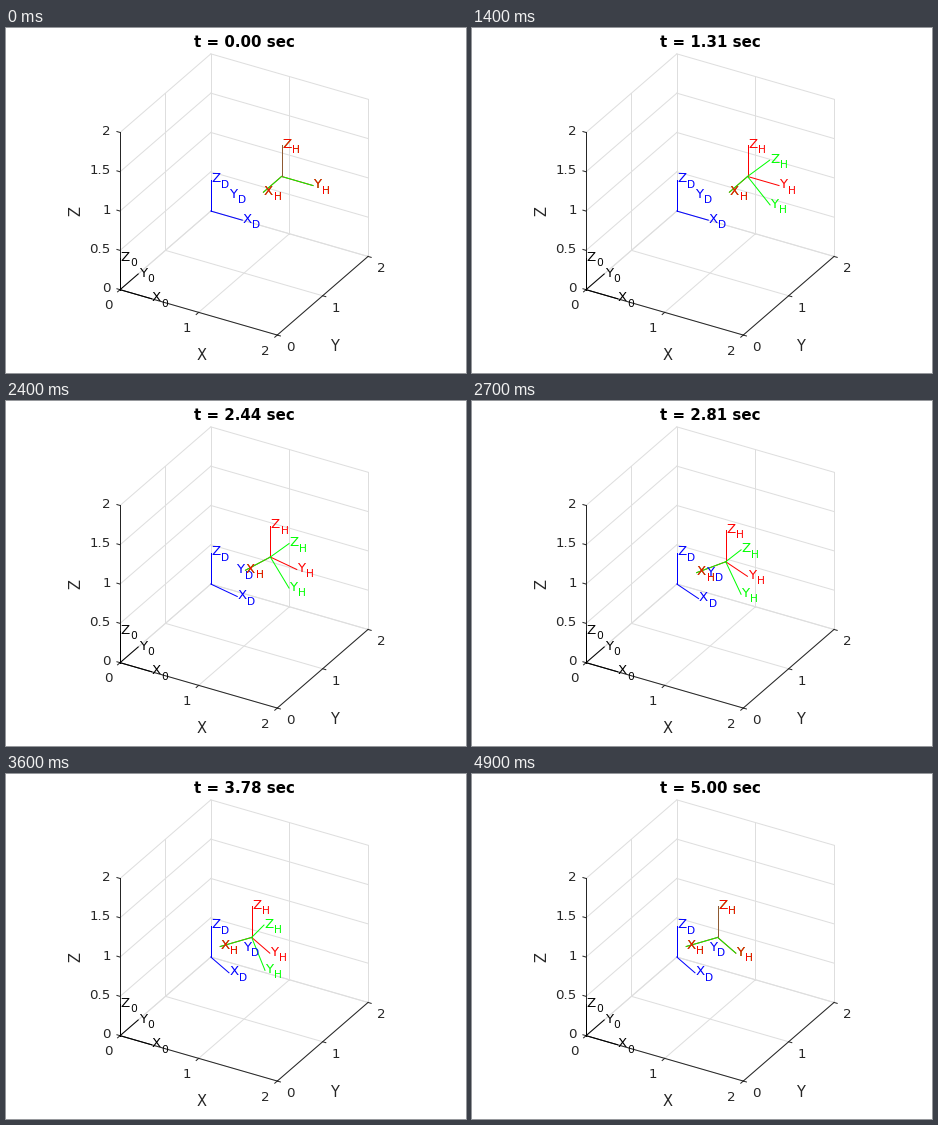
Animation, 460 px wide and 345 px high, one loop 4.95 s. Source, as a matplotlib script:

```python
import numpy as np
import matplotlib.pyplot as plt
from matplotlib.animation import FuncAnimation

W, H, DPI = 460, 345, 80
SEG_FRAMES = 33                      # each phase includes both end poses
SEG_TIMES = [0, 1.5, 3.5, 5]
ROLL, YAW = np.radians(45), np.radians(30)
AXIS_LEN = 0.4

# Orthographic view, azimuth and elevation 30 degrees
SCALE = 90.76
VIEW = SCALE * np.array([[np.sqrt(3) / 2, 0.25],
                         [0.5, -np.sqrt(3) / 4],
                         [0, -np.sqrt(3) / 2]])
ORIGIN = np.array([114.07, 261.67])

INK = "0.15"
GRID = "0.87"
RED, GREEN, BLUE, BLACK = "#ff0000", "#00ff00", "#0000ff", "#000000"
OVERLAP = "#8f5a32"

plt.rcParams["font.family"] = "DejaVu Sans"
fig = plt.figure(figsize=(W / DPI, H / DPI), dpi=DPI, facecolor="white")
ax = fig.add_axes([0, 0, 1, 1])
ax.set_xlim(0, W)
ax.set_ylim(H, 0)
ax.axis("off")


def pt(px):
    return px * 72 / DPI


def project(p):
    return ORIGIN + np.asarray(p, float) @ VIEW


def line(a, b, color, z):
    (x0, y0), (x1, y1) = project(a), project(b)
    return ax.plot([x0, x1], [y0, y1], color=color, lw=pt(1), zorder=z)[0]


def label(x, y, s, px=13.33, color=INK, ha="center", z=5, **kw):
    kw.setdefault("va", "baseline")
    return ax.text(x, y, s, fontsize=pt(px), color=color, ha=ha, zorder=z, **kw)


def draw_box():
    for v in (0, 1, 2):
        line((v, 0, 0), (v, 2, 0), GRID, 1)
        line((0, v, 0), (2, v, 0), GRID, 1)
        line((v, 2, 0), (v, 2, 2), GRID, 1)
        line((0, v, 0), (0, v, 2), GRID, 1)
    for v in (0, 0.5, 1, 1.5, 2):
        line((0, 0, v), (0, 2, v), GRID, 1)
        line((0, 2, v), (2, 2, v), GRID, 1)

    line((0, 0, 0), (2, 0, 0), INK, 2)
    line((2, 0, 0), (2, 2, 0), INK, 2)
    line((0, 0, 0), (0, 0, 2), INK, 2)

    for v in (0, 1, 2):
        line((v, 0, 0), (v, -0.055, 0), INK, 2)
        x, y = project((v, 0, 0))
        label(x - 12, y + 19.6, str(v))
        line((2, v, 0), (2.04, v, 0), INK, 2)
        x, y = project((2, v, 0))
        label(x + 13.2, y + 15.8, str(v))
    for v in (0, 0.5, 1, 1.5, 2):
        line((0, 0, v), (-0.04, 0, v), INK, 2)
        x, y = project((0, 0, v))
        label(104.6, y + 2.6, f"{v:g}", ha="right")

    label(196, 332.4, "X", 14.67)
    label(328, 323, "Y", 14.67)
    label(69.7, 183, "Z", 14.67, rotation=90, va="center")


class Triad:
    """Three labelled axes; 'shown' lists those that lie inside the box."""

    ADVANCE = {"X": 9.1, "Y": 8.1, "Z": 9.1}

    def __init__(self, sub, color, z, shown="XYZ"):
        self.parts = {}
        for name in "XYZ":
            shaft = line((0, 0, 0), (0, 0, 0), color, z)
            shaft.set_visible(name in shown)
            big = label(0, 0, name, color=color, ha="left", z=z + 10)
            small = label(0, 0, sub, 10.67, color, "left", z + 10)
            self.parts[name] = shaft, big, small

    def place(self, pos, rows):
        x0, y0 = project(pos)
        for (name, (shaft, big, small)), row in zip(self.parts.items(), rows):
            x, y = project(pos + AXIS_LEN * row)
            shaft.set_data([x0, x], [y0, y])
            big.set_position((x + 0.4, y + 2.6))
            small.set_position((x + self.ADVANCE[name] + 1.1, y + 8))


def ease(u):
    """Minimum-jerk profile."""
    return u**3 * (10 - 15 * u + 6 * u**2)


def yaw_rows(a):
    c, s = np.cos(a), np.sin(a)
    return np.array([[c, -s, 0], [s, c, 0], [0, 0, 1]])


def roll_rows(a):
    c, s = np.cos(a), np.sin(a)
    return np.array([[1, 0, 0], [0, c, -s], [0, s, c]])


BASE = np.array([0, 2, 0])
ARM = np.array([0.9, 0, 0.7])
MOUNT = np.array([[0, -1, 0], [1, 0, 0], [0, 0, 1]])

draw_box()
world = Triad("0", BLACK, 3)
world.place(np.zeros(3), np.eye(3))
door = Triad("D", BLUE, 4, shown="XZ")
hand = Triad("H", RED, 6)
tool = Triad("H", GREEN, 7)
for _, big, small in hand.parts.values():
    big.set_zorder(20)
    small.set_zorder(20)
title = label(238.1, 19, "", 15, BLACK, weight="bold")


def update(i):
    seg, k = divmod(i, SEG_FRAMES)
    u = k / (SEG_FRAMES - 1)
    t0, t1 = SEG_TIMES[seg:seg + 2]
    e = ease(u)
    roll = ROLL * (e, 1, 1 - e)[seg]
    yaw = YAW * (0, e, 1)[seg]

    turn = yaw_rows(yaw)
    grip = MOUNT @ turn
    pos = BASE + ARM @ turn
    door.place(BASE, turn)
    hand.place(pos, grip)
    tool.place(pos, roll_rows(roll) @ grip)
    # the two upright shafts blend while they coincide
    tool.parts["Z"][0].set_color(OVERLAP if roll < 0.01 else GREEN)
    title.set_text(f"t = {t0 + (t1 - t0) * u:.2f} sec")
    return []


anim = FuncAnimation(fig, update, frames=3 * SEG_FRAMES, interval=50,
                     repeat=True, repeat_delay=0)
plt.show()
```
